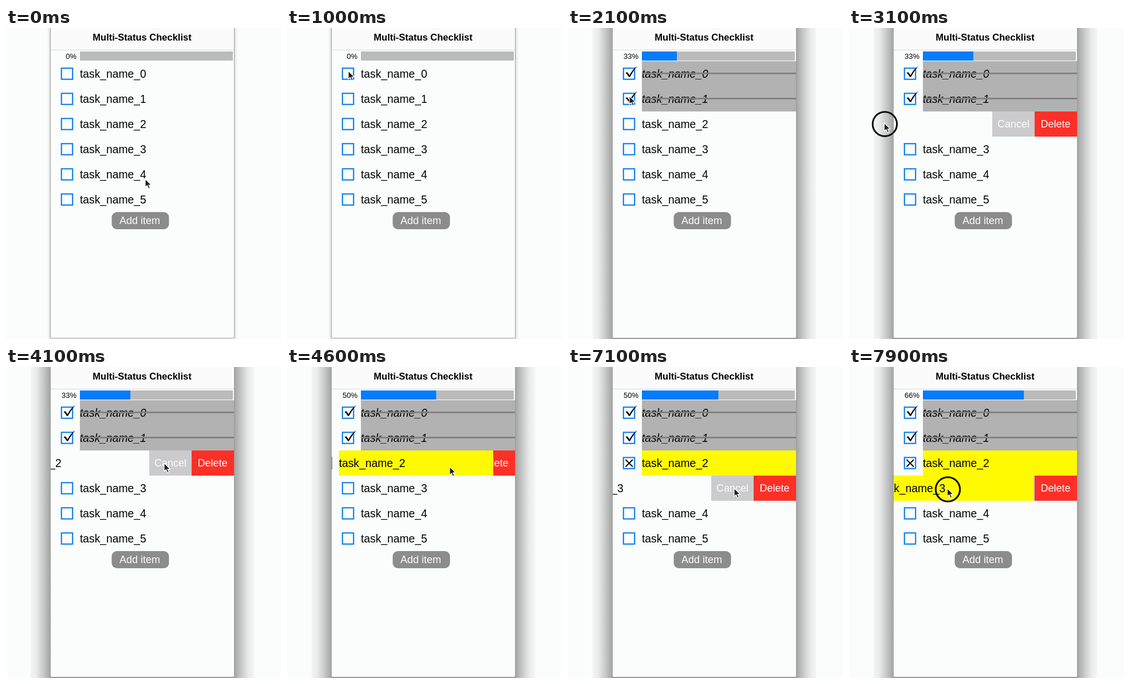
Animation, 480 px wide and 544 px high, one loop 8 s. Source, as an HTML page:

```html
<!DOCTYPE html>
<html lang="en">
<head>
<meta charset="utf-8">
<title>Multi-Status Checklist</title>
<style>
  html, body { margin: 0; width: 100%; height: 100%; overflow: hidden; background: #fbfdfc; }
  svg { display: block; width: 480px; height: 544px; }
  text { font-family: "Liberation Sans", Arial, sans-serif; }
  .task { font-size: 19.3px; }
  .button { font-size: 18px; fill: #fcfcfc; text-anchor: middle; }
</style>
</head>
<body>
<svg viewBox="0 0 480 544" xmlns="http://www.w3.org/2000/svg">
  <defs>
    <linearGradient id="soft">
      <stop offset="0" stop-color="#888" stop-opacity="0"/>
      <stop offset="1" stop-color="#888" stop-opacity=".28"/>
    </linearGradient>
    <linearGradient id="deep">
      <stop offset="0" stop-color="#666" stop-opacity=".05"/>
      <stop offset=".28" stop-color="#666" stop-opacity=".12"/>
      <stop offset=".6" stop-color="#666" stop-opacity=".32"/>
      <stop offset="1" stop-color="#666" stop-opacity=".6"/>
    </linearGradient>
    <clipPath id="screen"><rect x="78" y="0" width="320" height="542"/></clipPath>
  </defs>

  <rect width="480" height="544" fill="#fbfdfc"/>
  <g id="idleShadow" fill="url(#soft)">
    <rect x="72" width="6" height="544"/>
    <rect x="72" width="6" height="544" transform="matrix(-1 0 0 1 476 0)"/>
  </g>
  <g id="activeShadow" fill="url(#deep)">
    <rect x="43" width="35" height="544"/>
    <rect x="43" width="35" height="544" transform="matrix(-1 0 0 1 476 0)"/>
    <rect x="78" y="542" width="320" height="2" fill="#999"/>
  </g>
  <path d="M77.5 0V540q0 2.5 2.5 2.5H396q2.5 0 2.5-2.5V0" fill="#fbfdfc" stroke="#9c9c9c"/>

  <rect x="78" width="320" height="38" fill="#fafbfa"/>
  <path d="M78 38.5H398" stroke="#d8d8d8"/>
  <text x="237.5" y="22" font-size="16.5" font-weight="bold" text-anchor="middle">Multi-Status Checklist</text>
  <text id="percent" x="123" y="54" font-size="13" text-anchor="end"></text>
  <rect x="129" y="41" width="267" height="16" rx="1" fill="#bbb"/>
  <rect id="bar" x="129" y="41" height="16" fill="#067cfb"/>

  <g id="rows" clip-path="url(#screen)"></g>

  <rect x="184.5" y="322" width="100" height="30" rx="9" fill="#8c8c8c"/>
  <text class="button" x="233.5" y="343">Add item</text>

  <circle id="ring" r="21.2" fill="none" stroke="#080808" stroke-width="3"/>
  <path id="cursor" d="M0 0V14.5L3.4 11.5L5.8 17L8.4 15.9L6 10.5H10.5Z"
        fill="#1c1c1c" stroke="#fff" stroke-width="1.2" stroke-linejoin="round"/>
</svg>
<script>
const LOOP = 8000, STEP = 100, ROW_HEIGHT = 44, OPEN = 148, BAR_WIDTH = 267;
const $ = id => document.getElementById(id);

// time, x, y of the pointer tip
const pointerKeys = [
  [0, 243, 264], [100, 243, 264], [600, 107, 75], [1700, 107, 75], [1900, 107, 119],
  [2100, 107, 119], [2500, 255, 166], [2600, 255, 166], [3200, 46, 166], [3500, 46, 166],
  [4000, 276, 168], [4500, 276, 168], [4900, 326, 209], [5000, 326, 209], [5400, 111, 209],
  [5700, 111, 209], [6300, 290, 212], [7250, 290, 212], [7500, 248, 212], [7600, 248, 212],
  [8000, 146, 212]
];
const drags = [[2600, 3300], [5000, 5500], [7600, 8000]];

// time, leftward shift of a swiped row
const shiftKeys = {
  2: [[2600, 0], [3200, 209], [3300, 209], [3500, OPEN], [4400, OPEN], [4700, 0]],
  3: [[5000, 0], [5400, 215], [5500, 215], [5800, OPEN], [7200, OPEN], [7500, 0], [7600, 0], [8000, 102]]
};

const changes = [
  { at: 1200, row: 0, state: "done", percent: 16 },
  { at: 2000, row: 1, state: "done", percent: 33 },
  { at: 4400, row: 2, state: "cancelled", percent: 50 },
  { at: 7200, row: 3, state: "cancelled", percent: 66 }
];

const ease = p => p * p * (3 - 2 * p);
const clamp = p => Math.min(1, Math.max(0, p));

function sample(keys, t) {
  const next = keys.findIndex(key => key[0] > t);
  if (next === 0) return keys[0].slice(1);
  if (next < 0) return keys[keys.length - 1].slice(1);
  const [start, ...from] = keys[next - 1], [end, ...to] = keys[next];
  const p = (t - start) / (end - start);
  const k = end === LOOP ? p : ease(p);
  return from.map((v, i) => v + (to[i] - v) * k);
}

const show = (node, on) => node.setAttribute("visibility", on ? "inherit" : "hidden");

function makeRow(index) {
  const group = document.createElementNS("http://www.w3.org/2000/svg", "g");
  group.setAttribute("transform", `translate(0 ${58 + index * ROW_HEIGHT})`);
  group.innerHTML = `
    <g class="actions">
      <rect x="250" width="74" height="44" fill="#cbcbcd"/>
      <rect x="324" width="74" height="44" fill="#fd3027"/>
      <text class="button" x="287" y="28">Cancel</text>
      <text class="button" x="360.5" y="28">Delete</text>
    </g>
    <g class="content">
      <rect x="78" width="320" height="44" fill="#fbfdfc"/>
      <rect class="tint" x="129" width="269" height="44"/>
      <rect x="96.8" y="12.3" width="19.4" height="19.4" fill="#fdfefe" stroke="#0f80f2" stroke-width="2.2"/>
      <path class="tick" d="M100.5 20.5Q102.500 18.800 104.200 19.800L107.300 24.800Q112.500 14.500 121 8.500Q113 18.500 108.400 27.300Q107 28.800 106 27.300Q103.800 23 100.500 20.500Z"/>
      <path class="cross" d="M100.500 16L113 28.500M113 16L100.500 28.500" stroke="#000" stroke-width="1.900"/>
      <text class="task" x="129" y="29">task_name_${index}</text>
      <rect class="strike" x="129" y="20" width="269" height="2.800" fill="#808080"/>
    </g>`;
  $("rows").append(group);
  const part = name => group.querySelector("." + name);
  return {
    actions: part("actions"), content: part("content"), tint: part("tint"),
    tick: part("tick"), cross: part("cross"), label: part("task"), strike: part("strike")
  };
}

const rows = Array.from({ length: 6 }, (_, i) => makeRow(i));

function drawRow(row, index, t) {
  const change = changes.find(c => c.row === index && c.at <= t);
  const done = change?.state === "done", cancelled = change?.state === "cancelled";
  const shift = shiftKeys[index] ? sample(shiftKeys[index], t)[0] : 0;
  show(row.actions, shift > 0);
  row.content.setAttribute("transform", `translate(${-shift} 0)`);
  row.tint.setAttribute("fill", done ? "#b2b2b2" : cancelled ? "#fffa00" : "none");
  show(row.tick, done);
  show(row.cross, cancelled);
  show(row.strike, done);
  row.label.setAttribute("font-style", done ? "italic" : "normal");
}

function drawProgress(t) {
  let percent = 0, filled = 0;
  for (const change of changes) {
    if (change.at > t) break;
    filled += (change.percent - percent) * ease(clamp((t - change.at) / 230));
    percent = change.percent;
  }
  $("percent").textContent = percent + "%";
  $("bar").setAttribute("width", BAR_WIDTH * filled / 100);
}

function draw(t) {
  show($("idleShadow"), t < 1100);
  show($("activeShadow"), t >= 1100);
  drawProgress(t);
  rows.forEach((row, i) => drawRow(row, i, t));
  const [x, y] = sample(pointerKeys, t);
  $("cursor").setAttribute("transform", `translate(${x} ${y})`);
  $("ring").setAttribute("transform", `translate(${x + 1} ${y + 2})`);
  show($("ring"), drags.some(([start, end]) => t >= start && t < end));
}

const began = performance.now();
function tick() {
  const t = (performance.now() - began) % LOOP;
  draw(Math.floor(t / STEP) * STEP);
  requestAnimationFrame(tick);
}
tick();
</script>
</body>
</html>
```
